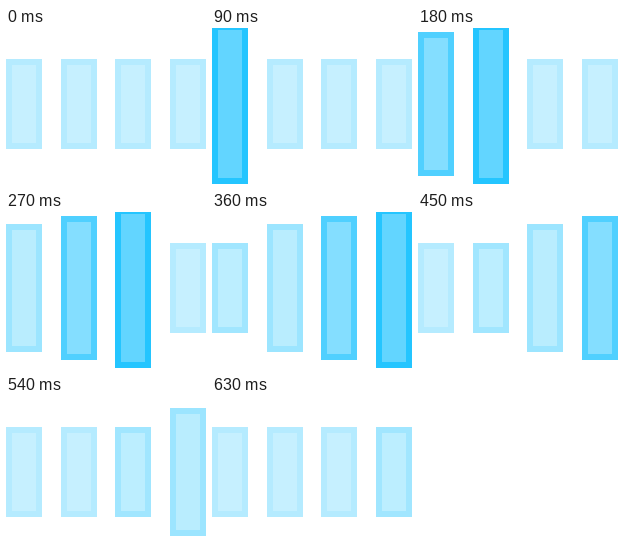
An HTML page for the animation above (720 ms loop, 200 by 156 pixels).

```html
<!DOCTYPE html>
<html lang="en">
<head>
<meta charset="utf-8">
<title>Loading bars</title>
<style>
  html, body {
    margin: 0;
    width: 100%;
    height: 100%;
    overflow: hidden;
    background: #fff;
  }
  .stage {
    position: relative;
    width: 200px;
    height: 156px;
    overflow: hidden;
  }
  .bar {
    position: absolute;
    left: var(--x);
    top: 31px;
    width: 36px;
    height: 90px;
    box-sizing: border-box;
    border: 6px solid #b5ebff;
    background: #c6f0ff;
    background-clip: padding-box;
    animation: pulse 720ms step-end calc(var(--n) * 90ms - 720ms) infinite;
  }
  /* Jump to full height, then shrink and fade in 90 ms steps */
  @keyframes pulse {
    0%    { top: -4px; height: 160px; border-color: #24c5ff; background-color: #62d5ff; }
    12.5% { top: 4px;  height: 144px; border-color: #50d0ff; background-color: #84deff; }
    25%   { top: 12px; height: 128px; border-color: #9ce5ff; background-color: #b9edfe; }
    37.5% { top: 31px; height: 90px;  border-color: #a1e6ff; background-color: #bceeff; }
    50%, 100% { top: 31px; height: 90px; border-color: #b5ebff; background-color: #c6f0ff; }
  }
</style>
</head>
<body>
<div class="stage">
  <div class="bar" style="--n:1; --x:0px"></div>
  <div class="bar" style="--n:2; --x:55px"></div>
  <div class="bar" style="--n:3; --x:109px"></div>
  <div class="bar" style="--n:4; --x:164px"></div>
</div>
</body>
</html>
```
